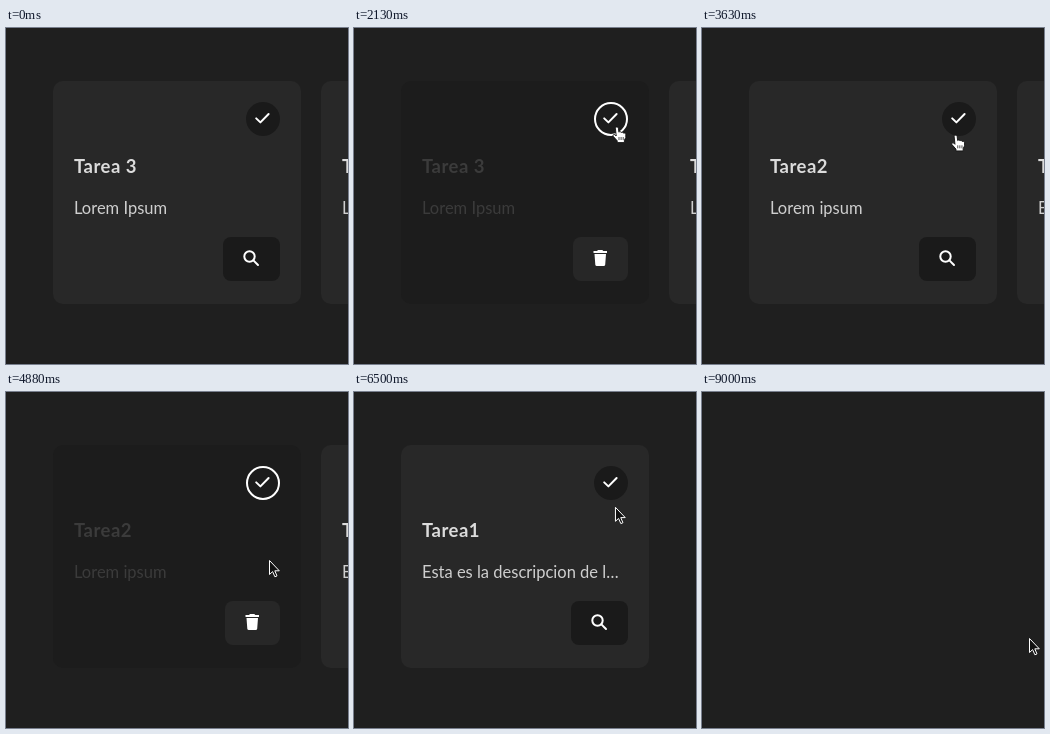
An HTML page for the animation above (9.37 s loop, 342 px wide and 336 px high).

```html
<!DOCTYPE html>
<html lang="es">
<head>
<meta charset="utf-8">
<title>Tareas</title>
<style>
  html, body { margin: 0; width: 100%; height: 100%; overflow: hidden; background: #1f1f1f; }
  svg { display: block; width: 342px; height: 336px; }
  text { font-family: Lato, "Open Sans", sans-serif; fill: #dcdcdc; }
  .title { font-size: 18.5px; font-weight: 700; letter-spacing: .5px; }
  .desc { font-size: 16.5px; font-weight: 400; fill: #cfcfcf; }
  .panel { fill: #282828; }
  .check, .action { fill: #1a1a1a; }
  .ring, .trash { visibility: hidden; }
  .hover .ring, .done .ring, .done .trash { visibility: visible; }
  .done .search { visibility: hidden; }
  .done .panel, .done .check { fill: #1c1c1c; }
  .done .action { fill: #272727; }
  .done text { fill: #3b3b3b; }
  .line { fill: none; stroke: #fff; stroke-width: 2; stroke-linecap: round; stroke-linejoin: round; }
</style>
</head>
<body>
<svg viewBox="0 0 342 336">
  <g id="cards"></g>
  <g id="cursor">
    <path id="arrow" d="M-.5 .5V14.5L2.6 11.6 4.9 16.8 7 15.9 4.8 10.8H9.3Z" fill="#111" stroke="#fff" stroke-linejoin="round"/>
    <g id="hand">
      <path d="M-2.6 1.2C-2.6-.5 .2-.6 .4 1.2L.9 5.2C1.5 4.3 3 4.5 3.2 5.5 4 4.9 5.3 5.2 5.6 6.2 6.7 5.7 7.8 6.4 7.8 7.6V10.5L6.4 13.2V15.6H-.8V13.8L-4.8 9.3C-5.6 8-4 6.9-3 7.8L-1.8 9Z" fill="#fff" stroke="#111" stroke-width=".9" stroke-linejoin="round"/>
      <path d="M1 10V13M3.1 10V13M5.2 10V13" stroke="#222" stroke-width=".8"/>
    </g>
  </g>
</svg>
<script>
const LOOP = 9370, STEP = 125, PITCH = 268;
const ENTRY = [365, 165], TRASH = [251, 237], EXIT = [328, 246];

// Times count ticks of STEP milliseconds; bows are sideways swings in pixels.
const tasks = [
  { title: "Tarea 3", desc: "Lorem Ipsum", aimX: 264,
    arrive: 8, done: 14, leave: 17, removed: 23, bowIn: 0, bowOut: 0 },
  { title: "Tarea2", desc: "Lorem ipsum", aimX: 255,
    arrive: 31, done: 33, leave: 35, removed: 44, bowIn: 0, bowOut: 11 },
  { title: "Tarea1", desc: "Esta es la descripcion de l…", aimX: 255,
    arrive: 56, done: 58, leave: 57, removed: 66, bowIn: 9, bowOut: 61 }
];

const byId = id => document.getElementById(id);
const easeOut = k => Math.sin(k * Math.PI / 2);
const easeInOut = k => k * k * (3 - 2 * k);

byId("cards").innerHTML = tasks.map(({ title, desc }) => `<g>
  <rect class="panel" x="47" y="53" width="248" height="223" rx="10"/>
  <circle class="check" cx="257" cy="91" r="17"/>
  <circle class="ring line" cx="257" cy="91" r="16"/>
  <path class="line" d="M250.2 90.4L254.4 94.4 262.6 86"/>
  <text class="title" x="68" y="145">${title}</text>
  <text class="desc" x="68" y="186">${desc}</text>
  <g class="search">
    <rect class="action" x="217" y="209" width="57" height="44" rx="8"/>
    <circle class="line" cx="243.5" cy="228.5" r="5.2"/>
    <path class="line" d="M247.4 232.4L252 237"/>
  </g>
  <g class="trash">
    <rect class="action" x="219" y="209" width="55" height="44" rx="8"/>
    <path fill="#fff" d="M239.5 223H243L244 222H248.3L249.3 223H253V225H239.5ZM240.5 226H252L251.2 236.7Q251 238 249.7 238H242.8Q241.5 238 241.3 236.7Z"/>
  </g>
</g>`).join("");
const cards = [...byId("cards").children];

// For each task the cursor goes to the check, then to the trash button.
const moves = [];
let from = ENTRY, start = 2;
for (const { aimX, arrive, leave, removed, bowIn, bowOut } of tasks) {
  const check = [aimX, 99];
  moves.push({ start, end: arrive, from, to: check, bow: bowIn, ease: easeOut });
  moves.push({ start: leave, end: removed - 1, from: check, to: TRASH, bow: bowOut, ease: easeInOut });
  from = TRASH;
  start = removed - 1;
}
moves.push({ start, end: start + 7, from, to: EXIT, bow: 0, ease: easeOut });

function cursorAt(tick) {
  const move = moves.filter(m => m.start <= tick).pop() || moves[0];
  const k = Math.min(1, Math.max(0, (tick - move.start) / (move.end - move.start)));
  const [x, y] = move.from.map((a, i) => a + (move.to[i] - a) * move.ease(k));
  return [x + move.bow * Math.sin(Math.PI * k), y];
}

function render(ms) {
  const tick = Math.floor(ms % LOOP / STEP);
  const current = tasks.filter(task => tick >= task.removed).length;
  cards.forEach((card, i) => {
    const { done } = tasks[i];
    card.style.display = i < current ? "none" : "";
    card.setAttribute("transform", `translate(${(i - current) * PITCH})`);
    card.setAttribute("class", tick >= done ? "done" : tick >= done - 2 ? "hover" : "");
  });

  const [x, y] = cursorAt(tick);
  const overCheck = Math.hypot(x - 257, y - 91) < 17;
  const overAction = x > 217 && x < 274 && y > 209 && y < 253;
  const pointing = current < tasks.length && (overCheck || overAction);
  byId("cursor").setAttribute("transform", `translate(${x} ${y})`);
  byId("hand").style.display = pointing ? "" : "none";
  byId("arrow").style.display = pointing ? "none" : "";
}

const began = performance.now();
function loop() {
  render(performance.now() - began);
  requestAnimationFrame(loop);
}
loop();
</script>
</body>
</html>
```
